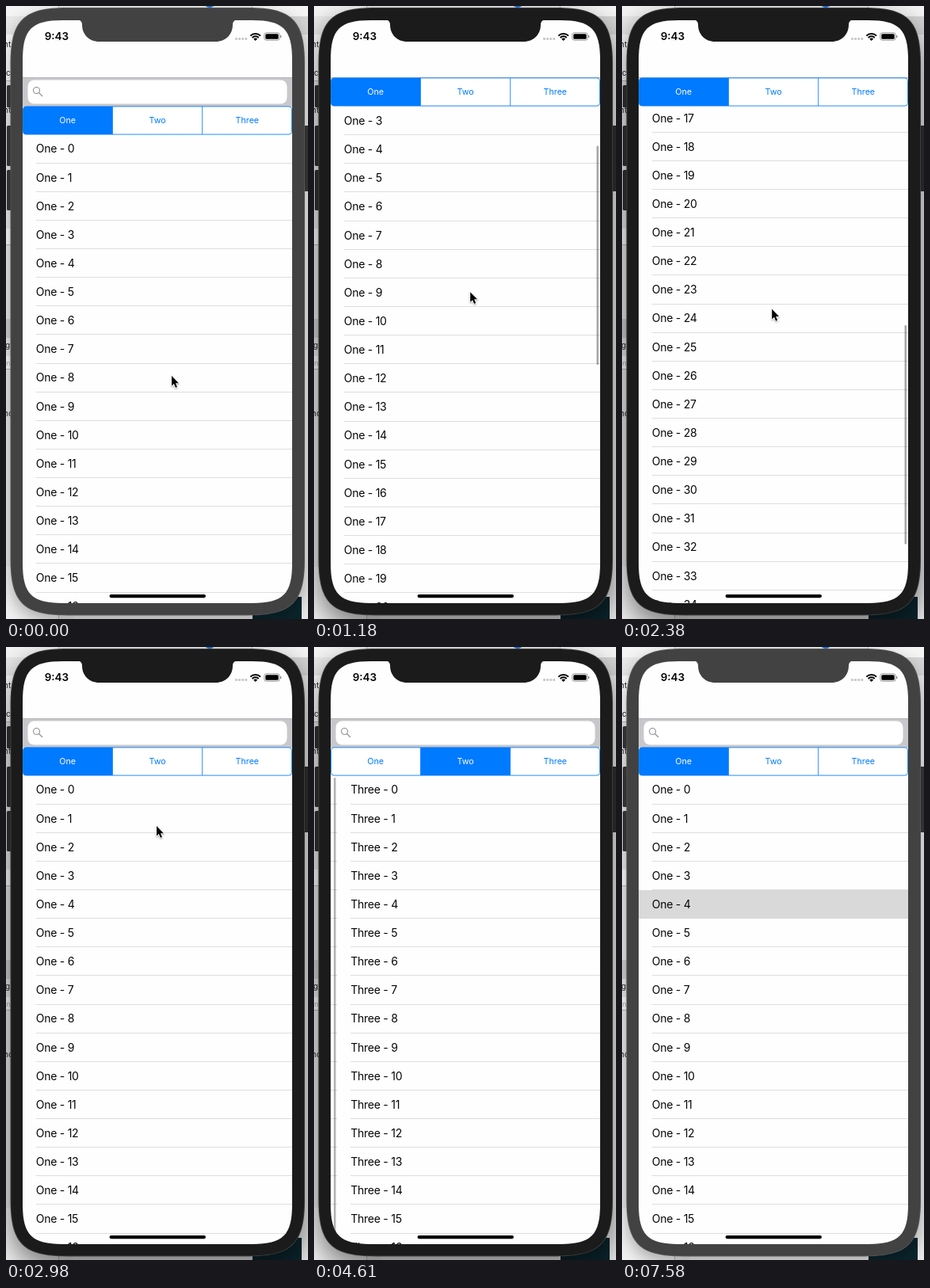
Animation, 381 px wide and 774 px high, one loop 7.68 s. Source, as an HTML page with a canvas:

```html
<!DOCTYPE html>
<html lang="en">
<head>
<meta charset="utf-8">
<title>Paged lists</title>
<style>
html, body { margin: 0; width: 381px; height: 774px; overflow: hidden; background: #e4e4e4; }
canvas { display: block; width: 381px; height: 774px; }
</style>
</head>
<body>
<canvas id="stage"></canvas>
<script>
const LOOP = 7680, STEP = 148.8, LEAD = 14, LAST = 51;
const BLUE = '#007aff', FONT = 'Inter, "Liberation Sans", sans-serif';
const LEFT = 21, WIDTH = 340, RIGHT = LEFT + WIDTH;
const ROW = 36.13, ROWS = 40, FOLD = 36, BAR_TOP = 90, LIST_TOP = 162.5;
const NAMES = ['One', 'Two', 'Three'];

const canvas = document.getElementById('stage');
const ctx = canvas.getContext('2d');
const ratio = window.devicePixelRatio || 1;
canvas.width = 381 * ratio;
canvas.height = 774 * ratio;
ctx.scale(ratio, ratio);

// Motion: n counts steps of about 149 ms.
const part = (n, a, b) => Math.min(1, Math.max(0, (n - a) / (b - a)));
const smooth = (n, a, b) => { const u = part(n, a, b); return u * u * (3 - 2 * u); };
const settle = (n, a, b, power) => 1 - (1 - part(n, a, b)) ** power;

const scrollAt = n => 774 * smooth(n, 4, 15) ** 1.4 * (1 - smooth(n, 15, 19));
const pageAt = n => settle(n, 21, 26, 2.66) + settle(n, 28, 32, 2.66) - 2 * settle(n, 38, 41, 5.08);
const barAlpha = n => part(n, 4, 5) * (1 - part(n, 17, 20));
const tabAt = n => n > 38 ? 0 : Math.floor(pageAt(n));

// Resting points of the pointer: step, x, y.
const stops = [[0, 209, 467], [5, 207, 443], [12, 182, 235], [17, 190, 400], [20, 190, 226],
  [21, 250, 320], [23, 19, 325], [28, 310, 315], [31, -20, 300], [37, 86, 141], [40, 86, 141],
  [46, 364, 745]];

function cursorAt(n) {
  const i = Math.max(1, stops.findIndex(s => s[0] >= n));
  const [a, ax, ay] = stops[i - 1], [b, bx, by] = stops[i];
  const k = smooth(n, a, b);
  return [ax + (bx - ax) * k, ay + (by - ay) * k];
}

function box(x, y, w, h, color) {
  ctx.fillStyle = color;
  ctx.fillRect(x, y, w, h);
}

function round(x, y, w, h, r, color) {
  ctx.beginPath();
  ctx.roundRect(x, y, w, h, r);
  ctx.fillStyle = color;
  ctx.fill();
}

// Rectangle whose corners ease into the sides.
function softRect(x, y, w, h, r) {
  const e = r * 1.4, c = r * .315, x2 = x + w, y2 = y + h;
  ctx.beginPath();
  ctx.moveTo(x + e, y);
  ctx.lineTo(x2 - e, y);
  ctx.bezierCurveTo(x2 - c, y, x2, y + c, x2, y + e);
  ctx.lineTo(x2, y2 - e);
  ctx.bezierCurveTo(x2, y2 - c, x2 - c, y2, x2 - e, y2);
  ctx.lineTo(x + e, y2);
  ctx.bezierCurveTo(x + c, y2, x, y2 - c, x, y2 - e);
  ctx.lineTo(x, y + e);
  ctx.bezierCurveTo(x, y + c, x + c, y, x + e, y);
  ctx.closePath();
}

function text(str, x, y, size, color, { align = 'left', weight = 400, spacing = 0 } = {}) {
  ctx.font = `${weight} ${size}px ${FONT}`;
  ctx.letterSpacing = spacing + 'px';
  ctx.textAlign = align;
  ctx.fillStyle = color;
  ctx.fillText(str, x, y);
}

function clipped(x, y, w, h, draw) {
  ctx.save();
  ctx.beginPath();
  ctx.rect(x, y, w, h);
  ctx.clip();
  draw();
  ctx.restore();
}

function drawDesktop() {
  box(0, 0, 381, 774, '#e8e8e8');
  box(0, 0, 66, 13, '#f4f4f4');
  box(311, 0, 70, 13, '#f4f4f4');
  box(311, 13, 70, 23, '#d4d4d4');
  for (const x of [66, 310]) box(x, 0, 1, 20, '#bdbdbd');
  ctx.beginPath();
  ctx.arc(257, -6, 8, 0, 7);
  ctx.fillStyle = '#1670d8';
  ctx.fill();

  for (const [y, h] of [[36, 58], [281, 20], [442, 16]]) {
    box(0, y, 8, h, '#fbfbfb');
    box(0, y + h, 8, 1, '#b8b8b8');
  }
  box(0, 395, 8, 24, '#d0d0d0');
  text('nt', -3, 52, 10, '#222');
  text('c', 0, 88, 10, '#222');
  text('nt', -3, 135, 10, '#222');
  text('g', -1, 432, 10, '#222');
  text('in', -2, 454, 9, '#aaa');
  text('nc', -3, 518, 10, '#222');

  box(0, 708, 66, 66, '#f1f1f1');
  box(66, 740, 1, 34, '#bcbcbc');
  box(85, 768, 226, 6, '#eeeeee');
  box(311, 746, 62, 28, '#0b252d');
}

function drawPhone(active) {
  const key = active ? '#303030' : '#383838';
  for (const [y, h] of [[100, 28], [151, 51], [207, 51]]) round(1, y, 8, h, 1.5, key);
  round(373, 151, 9, 83, 1.5, key);
  ctx.save();
  ctx.shadowColor = `rgba(0,0,0,${active ? .5 : .3})`;
  ctx.shadowBlur = (active ? 34 : 20) * ratio;
  ctx.shadowOffsetY = (active ? 14 : 8) * ratio;
  softRect(5.5, 2, 371.5, 767.5, 51);
  ctx.fillStyle = active ? '#3c3c3c' : '#555';
  ctx.fill();
  ctx.restore();
  softRect(6.5, 3, 369.5, 765.5, 50);
  ctx.fillStyle = active ? '#1b1b1b' : '#424242';
  ctx.fill();
}

function drawRows(page, top, shift, picked) {
  const x = LEFT + shift;
  for (let i = 0; i < ROWS; i++) {
    const y = top + i * ROW;
    const marked = picked && page === 0 && i === 4;
    if (marked) box(x, Math.round(y), WIDTH, 36, '#d9d9d9');
    text(`${NAMES[page]} - ${i}`, x + 16.7, y + 22.9, 14, '#050505', { spacing: -.25 });
    if (!marked) box(x + 16.5, Math.round(y + ROW) - 1, WIDTH - 16.5, 1, '#dedede');
  }
}

function drawSegments(y, chosen) {
  const third = WIDTH / 3;
  const outline = () => {
    ctx.beginPath();
    ctx.roundRect(LEFT + .5, y + .4, WIDTH - 1, 35.2, 3.5);
  };
  outline();
  ctx.fillStyle = '#fff';
  ctx.fill();
  ctx.save();
  ctx.clip();
  box(LEFT + chosen * third, y, third, 36, BLUE);
  for (const k of [1, 2]) box(LEFT + k * third - .4, y, .8, 36, BLUE);
  ctx.restore();
  outline();
  ctx.strokeStyle = BLUE;
  ctx.lineWidth = .85;
  ctx.stroke();
  NAMES.forEach((name, i) => text(name, LEFT + third * (i + .5), y + 21.7, 10.7,
    i === chosen ? '#fff' : BLUE, { align: 'center' }));
}

function drawSearch(fold) {
  clipped(LEFT, BAR_TOP, WIDTH, 37 - fold, () => {
    ctx.save();
    ctx.translate(0, -fold);
    box(LEFT, BAR_TOP, WIDTH, 37, '#c8c8cc');
    round(27.5, 93.5, 327, 30, 8, '#fff');
    ctx.strokeStyle = '#8e8e93';
    ctx.lineWidth = 1.1;
    ctx.beginPath();
    ctx.arc(38.5, 106.5, 4, 0, 7);
    ctx.moveTo(41.5, 109.5);
    ctx.lineTo(46, 114);
    ctx.stroke();
    ctx.restore();
  });
  box(LEFT, BAR_TOP, WIDTH, 1, '#b4b4b6');
}

function drawStatus() {
  text('9:43', 48.7, 43, 13.4, '#000', { weight: 600 });
  for (let i = 0; i < 4; i++) round(289 + i * 4.1, 40, 3, 3, 1, '#c9c9c9');
  const fan = (r, width) => {
    ctx.beginPath();
    ctx.arc(314.7, 44, r, -Math.PI * .75, -Math.PI * .25);
    ctx.lineWidth = width;
    ctx.stroke();
  };
  ctx.strokeStyle = '#000';
  fan(9, 2);
  fan(5.7, 2);
  fan(1.75, 3.5);
  ctx.beginPath();
  ctx.roundRect(325.8, 33.8, 19.4, 9.4, 2.6);
  ctx.strokeStyle = '#8a8a8a';
  ctx.lineWidth = .9;
  ctx.stroke();
  round(327.3, 35.3, 16.4, 6.4, 1.5, '#000');
  round(346, 37, 1.4, 3, .7, '#8a8a8a');
}

function drawNotch(color) {
  const mid = LEFT + WIDTH / 2;
  ctx.fillStyle = color;
  for (const side of [-1, 1]) {
    const x = d => mid + side * d;
    ctx.beginPath();
    ctx.moveTo(x(-.5), 17);
    ctx.lineTo(x(101), 17);
    ctx.quadraticCurveTo(x(95), 18, x(95), 23.5);
    ctx.bezierCurveTo(x(95), 36, x(86), 45, x(73.5), 45);
    ctx.lineTo(x(-.5), 45);
    ctx.fill();
  }
}

function drawCursor(x, y) {
  const pts = [[0, 0], [0, 14.5], [3.3, 11.5], [5.6, 17], [8, 16], [5.7, 10.6], [10.2, 10.6]];
  ctx.save();
  ctx.translate(x, y);
  ctx.scale(.87, .87);
  ctx.beginPath();
  pts.forEach(p => ctx.lineTo(...p));
  ctx.closePath();
  ctx.lineJoin = 'round';
  ctx.shadowColor = 'rgba(0,0,0,.35)';
  ctx.shadowBlur = 2 * ratio;
  ctx.shadowOffsetY = ratio;
  ctx.strokeStyle = '#fff';
  ctx.lineWidth = 2;
  ctx.stroke();
  ctx.shadowColor = 'transparent';
  ctx.fillStyle = '#000';
  ctx.fill();
  ctx.restore();
}

function drawLists(n, scroll, fold) {
  const page = pageAt(n), top = LIST_TOP - fold;
  clipped(LEFT, top, WIDTH, 760 - top, () => {
    NAMES.forEach((_, p) => {
      const shift = (p - page) * WIDTH;
      if (Math.abs(shift) < WIDTH) drawRows(p, LIST_TOP - (p ? 0 : scroll), shift, n >= 21);
    });
    const thumb = (x, y, h, alpha) => round(x, y, 2.5, h, 1.2, `rgba(0,0,0,${alpha})`);
    thumb(RIGHT - 4.5, top + 2 + (scroll - fold) * .445, 276.5, barAlpha(n) * .35);
    if (n >= 28) thumb(RIGHT - 4.5 + (1 - page) * WIDTH, 165, 583, .3);
  });
}

function draw(n) {
  const active = n > 0 && n < 47;
  const scroll = scrollAt(n), fold = Math.min(scroll, FOLD);

  drawDesktop();
  drawPhone(active);

  ctx.save();
  softRect(LEFT, 18, WIDTH, 736, 36);
  ctx.clip();
  box(LEFT, 18, WIDTH, 736, '#fefefe');
  drawLists(n, scroll, fold);
  drawSearch(fold);
  drawSegments(LIST_TOP - fold - 36, tabAt(n));
  drawStatus();
  round(130.5, 743, 121.5, 4.2, 2.1, '#000');
  ctx.restore();

  drawNotch(active ? '#1b1b1b' : '#424242');
  if (n < 47) drawCursor(...cursorAt(n));
}

let shown = -1;
const start = performance.now();

function tick() {
  const t = (performance.now() - start) % LOOP;
  const n = Math.min(LAST, Math.floor((t + LEAD) / STEP));
  if (n !== shown) draw(shown = n);
  requestAnimationFrame(tick);
}
tick();
</script>
</body>
</html>
```
